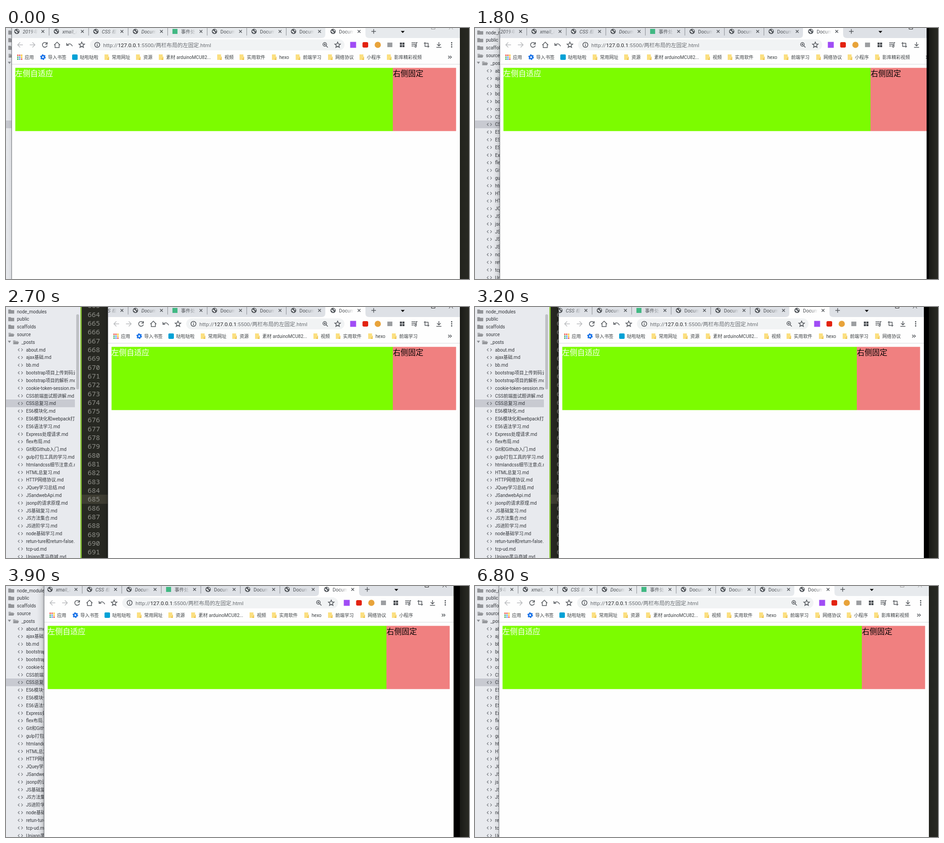
Recreate the animation shown at these times as an HTML page. Size 1015 by 551 pixels, loop 6.9 s.

```html
<!DOCTYPE html>
<html lang="zh">
<head>
<meta charset="utf-8">
<title>两栏布局</title>
<style>
  html, body { margin: 0; width: 100%; height: 100%; overflow: hidden; background: #272822; }
  svg { display: block; }
  text { font-family: Roboto, "Noto Sans CJK SC", "Noto Sans CJK", sans-serif; white-space: pre; }
  .tree text { font-size: 10px; fill: #33363b; }
  .lines text { font: 15px "Noto Sans Mono", monospace; fill: #90918b; text-anchor: end; }
  .tab text { font-size: 10.6px; }
  .mark text { font-size: 10.1px; fill: #3c4043; }
  .url { font-size: 11.8px; fill: #6a6e73; }
  .page { font-size: 16.67px; }
  .ico { fill: none; stroke: #54585d; stroke-width: 1.5; }
  .off { stroke: #b9bbbe; }
</style>
</head>
<body>
<svg id="stage" width="1015" height="551" viewBox="0 0 1015 551">
  <defs>
    <linearGradient id="fade" gradientUnits="userSpaceOnUse" x1="28" x2="46" y1="0" y2="0">
      <stop stop-color="#4d5156"/><stop offset="1" stop-color="#4d5156" stop-opacity="0"/>
    </linearGradient>
    <linearGradient id="shadeL">
      <stop stop-opacity="0"/><stop offset=".6" stop-opacity=".06"/><stop offset="1" stop-opacity=".22"/>
    </linearGradient>
    <linearGradient id="shadeR"><stop stop-opacity=".35"/><stop offset="1" stop-opacity="0"/></linearGradient>
    <clipPath id="frame"><rect id="hole" height="551"/></clipPath>
    <clipPath id="treeBox"><rect width="151" height="551"/></clipPath>
    <g id="globe">
      <circle r="5.8" fill="#54585d"/>
      <path d="M-4.4-1.6Q-1.5-2.4-.8-.6T2 1.2Q.8 4-1 4.3Q-.6 2-2.4 1.4T-4.4-1.6ZM.2-4.4Q3.6-4 4.3-.8Q2.4-.2 1.8-1.6T.2-4.4Z" fill="#eef0f2"/>
    </g>
    <path id="cross" d="M-3-3L3 3M3-3L-3 3" class="ico"/>
    <path id="star" d="M0-6.2L1.8-2L6.2-1.7L2.8 1.2L3.9 5.6L0 3.2L-3.9 5.6L-2.8 1.2L-6.2-1.7L-1.8-2Z" class="ico"/>
    <path id="folder" d="M-6.5-4.5H-1.5L0-3H6.5V4.5H-6.5Z" fill="#929498"/>
    <g id="opened">
      <path d="M-6-4H-1.5L0-2.500H5V-.5H-4L-6 4Z" fill="#a9abaf"/>
      <path d="M-4-.5H7L5 4.500H-6Z" fill="#929498"/>
    </g>
    <path id="code" d="M-2-3L-5 0L-2 3M2-3L5 0L2 3" fill="none" stroke="#70747a" stroke-width="1.2"/>
    <g id="note"><path d="M-5-6H3.5V6H-5Z" fill="#fbdf80"/><path d="M3.5-1H5V6H1V3H3.5Z" fill="#efc653"/></g>
  </defs>
  <g id="editor"></g>
  <rect x="983" width="12" height="551"/>
  <rect id="shadowL" width="16" height="551" fill="url(#shadeL)"/>
  <rect id="shadowR" x="995" width="16" height="551" fill="url(#shadeR)"/>
  <rect id="edge" width="1" height="551" fill="#6c7075"/>
  <g clip-path="url(#frame)">
    <rect width="1015" height="551" fill="#fefefe"/>
    <rect id="strip" width="1015" height="22"/>
    <rect y="79" width="1015" height="1" fill="#d9dbde"/>
    <rect id="pill" y="25" height="24" rx="12" fill="#f1f3f4"/>
    <rect id="green" y="87.5" height="138.8" fill="#7cfc00"/>
    <g id="left"></g>
    <g id="right"></g>
  </g>
</svg>
<script>
const $ = id => document.getElementById(id);
const set = (id, attrs) => { for (const k in attrs) $(id).setAttribute(k, attrs[k]); };
const use = (id, x, y) => `<use href="#${id}" x="${x}" y="${y}"/>`;
const text = (x, y, s, extra = '') => `<text x="${x}" y="${y}" ${extra}>${s}</text>`;
const rect = (x, y, w, h, fill, rx = 0) =>
  `<rect x="${x}" y="${y}" width="${w}" height="${h}" rx="${rx}" fill="${fill}"/>`;
const icon = (x, y, d, cls = '') => `<path class="ico ${cls}" transform="translate(${x} ${y})" d="${d}"/>`;
const grid = (n, f) => Array.from({ length: n }, (_, i) => f(i)).join('');

// Editor behind the browser window
const folders = ['node_modules', 'public', 'scaffolds', 'source', '_posts'];
const files = `about ajax基础 bb bootstrap项目上传到码云 bootstrap项目的解析 cookie-token-session
  CSS前端面试题讲解 CSS总复习 ES6模块化 ES6模块化和webpack打包 ES6语法学习 Express处理请求 flex布局
  Git和Github入门 gulp打包工具的学习 htmlandcss细节注意点 HTML总复习 HTTP网络协议 JQuey学习总结
  JSandwebApi jsonp的请求原理 JS基础复习 JS方法集合 JS进阶学习 node基础学习 retun-ture和return-false
  tcp-ud Uniapp黑马商城`.split(/\s+/);
const rowY = i => 10 + 16.81 * i;

function drawEditor() {
  const dirs = folders.map((name, i) => {
    const x = i === 4 ? 10 : 0;
    return use(i < 3 ? 'folder' : 'opened', 11.5 + x, rowY(i)) + text(24 + x, rowY(i) + 3.6, name);
  }).join('');
  const docs = files.map((name, i) =>
    use('code', 31.5, rowY(i + 5)) + text(44, rowY(i + 5) + 3.6, name + '.md')).join('');
  const numbers = grid(29, i => text(206, 2.2 + 19.33 * i, 663 + i));
  $('editor').innerHTML =
    rect(0, 0, 1015, 551, '#272822') + rect(0, 0, 163, 551, '#e8eaee') +
    rect(0, 203, 151, 17, '#c8cad1') + rect(154, 16, 6, 165, '#bec0c5', 3) +
    rect(163, 0, 3, 551, '#84bd35') + rect(166, 412, 60, 20, '#3e3d32') +
    `<g class="tree" clip-path="url(#treeBox)">${dirs}${docs}<path d="M4 74H11L7.500 79Z" fill="#8b8e93"/></g>
     <g class="lines">${numbers}</g>`;
}

// Bookmarks: icon centre, right end, label; positions for a window starting at 13
const marks = [
  [30, 62, '应用'], [81, 132, '导入书签'], [151, 202, '哒啦哒啦'], [221, 272, '常用网址'],
  [290, 321, '资源'], [340, 449, '素材 arduinoMCU82...'], [468, 499, '视频'], [517, 569, '实用软件'],
  [588, 622, 'hexo'], [640, 691, '前端学习'], [711, 762, '网络协议'], [780, 821, '小程序'],
  [840, 912, '影库精彩视频']
];
const appColors = ['#ea4335', '#ea4335', '#fbbc04', '#34a853', '#4285f4', '#fbbc04', '#34a853', '#4285f4', '#ea4335'];

function markIcon(i, x) {
  if (i === 0) return grid(9, k => rect(x - 5.5 + k % 3 * 4.2, 58.5 + (k / 3 | 0) * 4.2, 2.8, 2.8, appColors[k]));
  if (i === 1) return `<circle cx="${x}" cy="64" r="3.4" fill="none" stroke="#1a73e8" stroke-width="3"/>
    <circle cx="${x}" cy="64" r="5.2" fill="none" stroke="#1a73e8" stroke-width="2" stroke-dasharray="2.7 2.745"/>`;
  if (i === 2) return rect(x - 6, 58, 12, 12, '#00a1d6', 2);
  return use('note', x, 64);
}

function drawLeft() {
  $('left').innerHTML =
    icon(31, 37, 'M6 0H-5.5M0-5.500L-5.500 0L0 5.500', 'off') +
    icon(58, 37, 'M-6 0H5.5M0-5.500L5.500 0L0 5.500', 'off') +
    icon(85, 37, 'M4.800-2.500A5.300 5.300 0 1 0 5.200 1.500M5.300-6V-1.500H.8') +
    icon(112, 37, 'M-6.500 .5L0-6L6.500 .5M-4.500-1V6H4.500V-1') +
    icon(139, 37, 'M-6-4V1H-1M-5.500 .5Q2-6 6.500 3') +
    use('star', 166, 37) +
    icon(200, 37, 'M-5.500 0A5.500 5.500 0 1 1 5.500 0A5.500 5.500 0 1 1-5.500 0M0-1V3.300M0-3.400V-2') +
    text(213, 41.5, 'http://<tspan fill="#202124">127.0.0.1</tspan>:5500/两栏布局的左固定.html', 'class="url"') +
    marks.map(([x, , label], i) =>
      `<g class="mark">${markIcon(i, x)}${text(x + 11, 67.8, label)}</g>`).join('') +
    text(20, 105.5, '左侧自适应', 'class="page" fill="#fff"');
}

// Tab strip and the parts anchored to the right side
const tabs = ['2019年终', 'xmall_api', 'CSS 框架', 'Document', '事件处理', 'Document', 'Document', 'Document', 'Document'];

function drawTab(label, i) {
  const slant = i < 4 ? ' font-style="italic"' : '';
  const mark = i === 4 ? rect(-5.5, -5.5, 11, 11, '#41b883') : use('globe', 0, 0);
  const line = i && i < 8 ? rect(-16.5, -8, 1, 17, '#85898f') : '';
  return `<g class="tab" transform="translate(${23.8 + 86.65 * i} 7.5)">${line}${mark}
    ${text(13, 4, label, 'fill="url(#fade)"' + slant)}${use('cross', 57, 0)}</g>`;
}

function drawRight() {
  $('right').innerHTML =
    '<path d="M692 22Q700 22 700 14V0H788V14Q788 22 796 22Z" fill="#fefefe"/>' +
    tabs.map(drawTab).join('') +
    icon(806, 7.5, 'M-5 0H5M0-5V5') + '<path d="M865.500 6.500H874L869.700 11Z"/>' +
    '<path id="buttons" d="M932.500-3V2.500H940.500V-3M971 3L976-2M975-2L980 3" fill="none"/>' +
    icon(700, 37, 'M2.800-1A4 4 0 1 1-5.200-1A4 4 0 1 1 2.800-1M1.800 2L5.500 5.700M-3.200-1H.8M-1.200-3V1') +
    use('star', 727, 37) +
    rect(754.5, 30.5, 13, 13, '#a04cf5') + rect(781.5, 31, 12.5, 12, '#e32210', 3) +
    '<circle cx="815" cy="37" r="6.8" fill="#e8a33a"/>' + rect(836, 32, 11, 10, '#9c9ea1') +
    grid(4, k => rect(863.5 + k % 2 * 5.5, 32 + (k >> 1) * 5.5, 4.5, 4.5, '#44484d')) +
    icon(895, 37, 'M-6-4.500H3M-6-1H3M-6 2.500H-1M4.500 3V-5H7M4.500 3A1.700 1.700 0 1 1 1.200 3A1.700 1.700 0 1 1 4.500 3') +
    icon(922, 37, 'M-3.500-6V3.500H6M-6-3.500H3.500V6') +
    icon(949, 37, 'M0-6V2.500M-4-1.500L0 2.500L4-1.500M-5.500 5.500H5.500') +
    grid(3, k => `<circle cx="977" cy="${32.5 + 4.5 * k}" r="1.4" fill="#44484d"/>`) +
    icon(973, 64, 'M-3.500-3L-.5 0L-3.500 3M.5-3L3.500 0L.5 3') +
    rect(848, 87.5, 138.7, 138.8, '#f08080') +
    text(848.3, 105.5, '右侧固定', 'class="page" fill="#000"');
}

// Left window edge, one entry per 100 ms of the drag
const drag = [13, 20, 36, 55, 74, 93, 110, 129, 150, 172, 197, 224, 224, 219, 211, 203, 195,
  184, 167, 152, 140, 127, 113, 98, 84, 72, 62, 55, 54, 53];
const LOOP = 6900, DRAG_START = 1500, BLUR = 6800, EDGE = 995;

function render(t) {
  const step = Math.max(0, Math.min(drag.length - 1, Math.floor((t - DRAG_START) / 100)));
  const x = drag[step];
  // The content keeps the previous width for one step while dragging
  const settled = step === drag.length - 1;
  const lag = settled || !step ? 0 : x - drag[step - 1];
  const right = lag > 0 ? 990 : EDGE + lag;
  const active = t >= DRAG_START && t < BLUR;

  set('hole', { x, width: right - x });
  set('edge', { x: x - 1 });
  set('shadowL', { x: x - 16, opacity: active ? 1 : .4 });
  set('shadowR', { opacity: active ? 1 : .4 });
  set('strip', { fill: active ? '#dee1e6' : '#e7eaed' });
  set('buttons', { stroke: active ? '#222' : '#999' });
  set('pill', { x: x + 171, width: 571 + lag - x });
  set('green', { x: x + 7.4, width: 840.6 + lag - x });
  set('left', { transform: `translate(${x - 13} 0)` });
  set('right', { transform: `translate(${lag} 0)` });
  markNodes.forEach((node, i) => {
    const fits = marks[i][1] + x - 13 <= EDGE + lag - 40;
    node.setAttribute('visibility', fits ? 'visible' : 'hidden');
  });
}

drawEditor();
drawLeft();
drawRight();
const markNodes = document.querySelectorAll('.mark');
const start = performance.now();
function tick() {
  render((performance.now() - start) % LOOP);
  requestAnimationFrame(tick);
}
tick();
</script>
</body>
</html>
```
